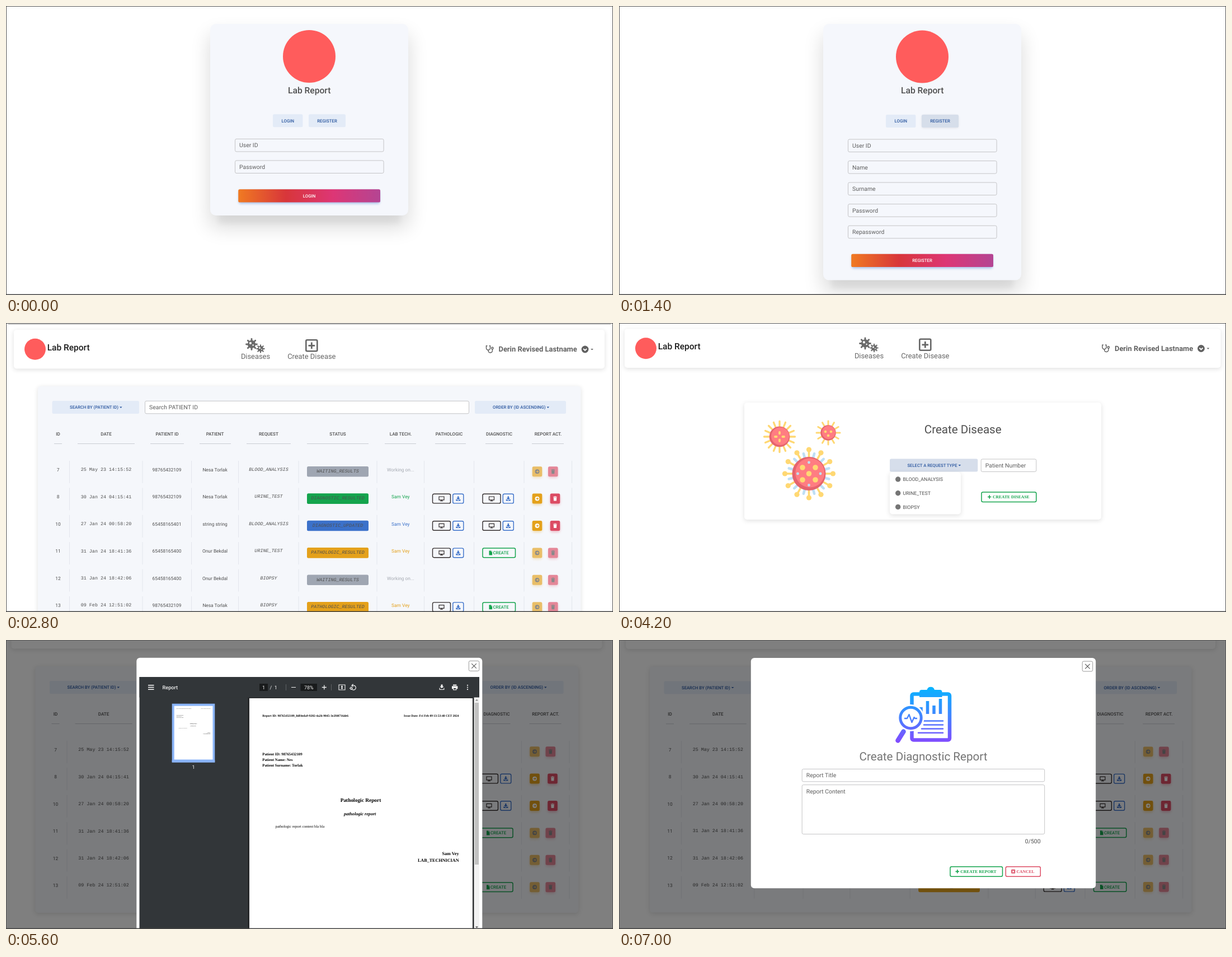
Write an HTML page that moves like this. It is 1085 px wide and 516 px high and loops after 8 s.

```html
<!DOCTYPE html>
<html lang="en">
<head>
<meta charset="utf-8">
<title>Lab report walkthrough</title>
<style>
html, body { margin: 0; width: 100%; height: 100%; overflow: hidden; background: #fff; }
svg { display: block; width: 1085px; height: 516px; font-family: Roboto, sans-serif; }
text { white-space: pre; text-rendering: geometricPrecision; }
.m { text-anchor: middle; }
.e { text-anchor: end; }
.w { font-weight: 500; }
.b { font-weight: 700; }
.i { font-style: italic; }
.mono { font-family: "Liberation Mono", monospace; }
.serif { font-family: "Liberation Serif", serif; }
</style>
</head>
<body>
<svg id="stage" viewBox="0 0 1085 516"></svg>
<script>
const INK = '#4f4f4f', BLUE = '#3b71ca', GREEN = '#14a44d', AMBER = '#e4a11b', RED = '#dc4c64', GREY = '#9fa6b2';
const NAVY = '#2c58a0', PALE = '#e3ebf7', PANEL = '#f5f7fb', LINE = '#c4c4c6';

// Basic shapes
const text = (x, y, s, size, fill = INK, cls = '') =>
  `<text x="${x}" y="${y}" font-size="${size}" fill="${fill}" class="${cls}">${s}</text>`;
const rect = (x, y, w, h, r, fill, more = '') =>
  `<rect x="${x}" y="${y}" width="${w}" height="${h}" rx="${r}" fill="${fill}" ${more}/>`;
const frame = (x, y, w, h, color, width = 1.3, fill = 'none') =>
  rect(x, y, w, h, 2.5, fill, `stroke="${color}" stroke-width="${width}"`);
const dot = (x, y, r, fill, more = '') => `<circle cx="${x}" cy="${y}" r="${r}" fill="${fill}" ${more}/>`;
const stroke = (d, color, width = 1, more = '') =>
  `<path d="${d}" fill="none" stroke="${color}" stroke-width="${width}" ${more}/>`;
const shape = (d, fill) => `<path d="${d}" fill="${fill}"/>`;
const at = (x, y, s, scale = 1) => `<g transform="translate(${x} ${y}) scale(${scale})">${s}</g>`;
const shadow = (x, y, w, h, dy, blur, alpha, color = '#000') =>
  rect(x, y + dy, w, h, 4, color, `opacity="${alpha}" style="filter:blur(${blur}px)"`);
const card = (x, y, w, h, fill = '#fff') => shadow(x, y, w, h, 2, 4, .12) + rect(x, y, w, h, 5, fill);
const rays = (n, r1, r2, width, color, ball = 0, turn = 0) => {
  let d = '', balls = '';
  for (let k = 0; k < n; k++) {
    const a = (k / n) * 2 * Math.PI + turn, c = Math.cos(a), s = Math.sin(a);
    d += `M${c * r1} ${s * r1}L${c * r2} ${s * r2}`;
    if (ball) balls += dot(c * r2, s * r2, ball, color);
  }
  return stroke(d, color, width, 'stroke-linecap="round"') + balls;
};

// Form parts
const caret = (x, y, color) => shape(`M${x} ${y}h4.6l-2.3 2.4z`, color);
const input = (x, y, w, h, label, fill = 'none') =>
  frame(x, y, w, h, LINE, 1, fill) + text(x + 7.6, y + 15, label, 10.4, '#5e5e5e');
const button = (x, y, w, label, fill = PALE) =>
  rect(x, y, w, 23, 2.5, fill) + text(x + w / 2, y + 14.2, label, 7.8, NAVY, 'm w');
const dropdown = (x, y, w, label, end, fill) =>
  rect(x, y, w, 23, 2.5, fill) + text(end, y + 14.2, label, 7.7, NAVY, 'e w') + caret(end + 2, y + 10.5, NAVY);
const closeBox = (x, y) => frame(x, y, 18.5, 18, '#999', 1) +
  stroke(`M${x + 5} ${y + 4.8}l8.5 8.5m0 -8.5l-8.5 8.5`, '#555', 1.1);
const plus = (x, y, r, color, width) => stroke(`M${x - r} ${y}h${2 * r}M${x} ${y - r}v${2 * r}`, color, width);
const outlined = (x, y, w, label, color, tx) =>
  frame(x, y, w, 17.5, color, 1.5) + text(tx, y + 11.3, label, 7.6, color, 'serif b');

// Small icons, centred on 0,0
const monitor = stroke('M-4.5 -3.6h9v5.8h-9zM-2.4 4h4.8M0 2v2', '#332d2d', 1.2);
const download = shape('M-1.2 -4h2.4v3h2.2l-3.4 3.2l-3.4 -3.2h2.2zM-4 1.4h1.6l2.4 2l2.4 -2h1.6v2.6h-8z', BLUE);
const file = shape('M-2.8 -4h3.4v2.2h2.2v5.8h-5.6zM1.2 -4l1.6 1.6h-1.6z', GREEN);
const trash = c => shape('M-3.2 -3.6h2l.5 -.7h1.4l.5 .7h2v1.1h-6.4zM-2.8 -2h5.6l-.4 6h-4.8z', c);
const arrow = (c, bg) => dot(0, 0, 3.9, c) + stroke('M-2.2 0h4M0 -1.9l1.9 1.9l-1.9 1.9', bg, 1.1);
const germ = (r, n) => rays(n, 0, r * .9, r * .28, '#6b6b6b') + dot(0, 0, r * .68, '#6b6b6b') +
  dot(-r * .2, -r * .2, r * .2, '#fff') + dot(r * .25, r * .15, r * .12, '#fff');
const stethoscope = stroke('M-3.5 -6h-2v4a3.5 3.5 0 0 0 7 0v-4h-2M-2 1.5v1a3.7 3.7 0 0 0 7.4 0v-3', '#616161', 1.5) +
  dot(5.4, -1.8, 1.7, '#fff', 'stroke="#616161" stroke-width="1.4"');

function sign(dy, height, fields, action, registering) {
  const bottom = 32 + height, by = bottom - 46.7;
  return shadow(365, 32, 354, height, 20, 18, .15) + shadow(379, 46, 326, height - 14, 15, 4, .03) +
    rect(365, 32, 354, height, 10, '#f5f7fc') +
    at(0, dy,
      dot(542, 90, 47, '#ff5c5c') +
      text(542.2, 155.7, 'Lab Report', 15.6, INK, 'm w') +
      button(477, 193.3, 53.5, 'LOGIN') +
      (registering ? shadow(541, 193, 66, 23, 1.5, 2, .08) : '') +
      button(541, 193.3, 66, 'REGISTER', registering ? '#d6deea' : PALE) +
      fields.map((f, k) => input(409.5, 237.4 + 38.55 * k, 265.6, 22.6, f)).join('')) +
    shadow(416, by, 252, 23.3, 2.5, 2, .4, BLUE) +
    rect(415.2, by, 253.8, 23.3, 2.6, 'url(#warm)') +
    text(542, by + 14.3, action, 7.8, '#fff', 'm w');
}

function header(x, right, y, nav) {
  return card(x, y, right - x, 69.5) +
    dot(x + 38, y + 34.7, 19, '#ff5c5c') +
    text(x + 59.7, y + 36.5, 'Lab Report', 15.5, '#1c1c1c', 'w') +
    at(nav - 7, y + 26, germ(10.5, 8)) + at(nav + 9, y + 34, germ(7.5, 8)) +
    text(nav, y + 52, 'Diseases', 12.9, '#666', 'm') +
    rect(nav + 90.3, y + 18.3, 20, 20, 2, 'none', 'stroke="#666" stroke-width="2.6"') +
    plus(nav + 100.3, y + 28.3, 5.8, '#666', 2.8) +
    text(nav + 100.3, y + 52, 'Create Disease', 12.9, '#666', 'm') +
    at(right - 206, y + 34.8, stethoscope) +
    text(right - 189.5, y + 39, 'Derin Revised Lastname', 12.9, '#616161', 'b') +
    dot(right - 35, y + 35, 6.4, '#616161') +
    stroke(`M${right - 38} ${y + 34}l3 3l3 -3`, '#fff', 1.8) +
    caret(right - 24.8, y + 34, '#616161');
}

// Column: title, centre, underline start and end, separator
const COLUMNS = [
  ['ID', 93, 86, 100, 113.5], ['DATE', 179, 128, 230, 244], ['PATIENT ID', 288, 258, 318, 331.5],
  ['PATIENT', 373.5, 346, 402, 415.5], ['REQUEST', 469.5, 430, 509, 523], ['STATUS', 593, 538, 648, 663],
  ['LAB TECH.', 705.5, 677, 733, 747.5], ['PATHOLOGIC', 792, 767, 822, 836.5],
  ['DIAGNOSTIC', 881.5, 857, 906, 926], ['REPORT ACT.', 969, 940, 997, 1011.5]];
const STATUS = {
  WAITING_RESULTS: GREY, DIAGNOSTIC_RESULTED: GREEN, DIAGNOSTIC_UPDATED: BLUE, PATHOLOGIC_RESULTED: AMBER };
const ROWS = [
  [7, '25 May 23 14:15:52', '98765432109', 'Nesa Torlak', 'BLOOD_ANALYSIS', 'WAITING_RESULTS'],
  [8, '30 Jan 24 04:15:41', '98765432109', 'Nesa Torlak', 'URINE_TEST', 'DIAGNOSTIC_RESULTED'],
  [10, '27 Jan 24 00:58:20', '65458165401', 'string string', 'BLOOD_ANALYSIS', 'DIAGNOSTIC_UPDATED'],
  [11, '31 Jan 24 18:41:36', '65458165400', 'Onur Bekdal', 'URINE_TEST', 'PATHOLOGIC_RESULTED'],
  [12, '31 Jan 24 18:42:06', '65458165400', 'Onur Bekdal', 'BIOPSY', 'WAITING_RESULTS'],
  [13, '09 Feb 24 12:51:02', '98765432109', 'Nesa Torlak', 'BIOPSY', 'PATHOLOGIC_RESULTED']];

const viewPair = (x, y) => frame(x, y - 8.3, 32, 16.6, '#332d2d', 1.4) + at(x + 16, y, monitor) +
  frame(x + 36.3, y - 8.3, 19, 16.6, BLUE, 1.4) + at(x + 45.8, y, download);
const action = (x, y, color, icon, off) => `<g opacity="${off ? .65 : 1}">` +
  shadow(x, y - 9, 17.6, 18, 2.5, 2, .35, color) + rect(x, y - 9, 17.6, 18, 2.5, color) + at(x + 8.8, y, icon) + '</g>';

function row([id, date, pid, name, request, status], k) {
  const y = 262 + 48.4 * k, mid = y + 3.2, color = STATUS[status];
  const waiting = color === GREY, done = status.startsWith('DIAG'), glyph = done ? '#fff' : INK;
  let s = COLUMNS.map(c => stroke(`M${c[4]} ${y - 16}v40`, '#e1e4ea', .9)).join('') +
    text(93, y + 3, id, 8.4, INK, 'm') + text(179, y + 2.3, date, 8.4, INK, 'm mono') +
    text(287.5, y + 3, pid, 8.4, INK, 'm') + text(373.5, y + 3, name, 8.4, INK, 'm') +
    text(469.5, y + 2, request, 8.4, INK, 'm mono i') +
    rect(538, mid - 9.3, 110, 18.6, 2.5, color) + text(593, y + 5, status, 8.4, INK, 'm mono i') +
    text(705.3, y + 3, waiting ? 'Working on...' : 'Sam Vey', 8.4, waiting ? '#a6aab2' : color, 'm');
  if (!waiting) s += viewPair(762.5, mid);
  if (done) s += viewPair(852, mid);
  else if (!waiting) s += frame(852, mid - 8.3, 58.5, 16.6, GREEN, 1.5) + at(866.3, mid, file) +
    text(870.5, mid + 2.7, 'CREATE', 7.8, GREEN, 'w');
  return s + action(940.7, mid, AMBER, arrow(glyph, AMBER), !done) +
    action(done ? 972.7 : 969, mid, RED, trash(glyph), !done);
}

const list = header(14, 1070, 12, 446) + card(57, 113, 970.5, 440, PANEL) +
  dropdown(82.5, 139, 155.5, 'SEARCH BY (PATIENT ID)', 201, PALE) +
  input(248.5, 139.3, 579, 22.5, 'Search PATIENT ID', '#fff') +
  dropdown(838, 139, 163, 'ORDER BY (ID ASCENDING)', 964.5, PALE) +
  COLUMNS.map(([s, x, a, b]) => text(x, 201, s, 8.1, INK, 'm w') + stroke(`M${a} 215.5H${b}`, '#c9ccd3', 1)).join('') +
  ROWS.map(row).join('');

// Creating a disease
const virus = (r, spikes) => spikes + dot(0, 0, r, '#e5646e') +
  dot(r * .06, -r * .05, r * .87, '#ff7d82');
const YELLOW = '#ffd873', SKY = '#bfdff5';
const dots = (points, r, color) => points.map(([x, y]) => dot(x, y, r, color)).join('');
const viruses =
  at(287, 203, virus(18.3, rays(16, 14, 27.5, 3.4, YELLOW)) +
    [0, 90, 180, 270].map(a => `<g transform="rotate(${a})">${rect(-1.9, -10, 3.8, 6.5, 1.9, YELLOW)}</g>`).join('')) +
  at(374, 196, virus(13.7, rays(12, 10, 21, 3, YELLOW)) + dots([[-5, -2], [5, -2], [0, 5]], 2.3, YELLOW)) +
  at(339.5, 269, virus(30, rays(12, 28, 37, 4.6, SKY, 0, Math.PI / 12) + rays(12, 25, 43, 3.6, YELLOW, 4.6)) +
    dots([[0, 0], [-11.5, -11], [11.5, -11], [-11.5, 11], [11.5, 11]], 4.8, YELLOW) +
    dots([[0, -20], [0, 20.5], [-20, 0], [20.5, 0]], 2.4, SKY));

const create = header(10, 1075.5, 10.5, 447) + card(224, 142, 638, 209) + viruses +
  text(614.7, 197, 'Create Disease', 20.6, INK, 'm') +
  dropdown(484, 242.5, 157.3, 'SELECT A REQUEST TYPE', 604.5, '#d6deeb') +
  input(647.2, 243, 98.6, 22.5, 'Patient Number') +
  card(484, 266, 127, 75.5) +
  ['BLOOD_ANALYSIS', 'URINE_TEST', 'BIOPSY'].map((s, k) =>
    dot(498.7, 279 + 24.7 * k, 4.7, '#757575') + text(507.5, 282.2 + 24.7 * k, s, 8.8)).join('') +
  outlined(648, 302, 97.8, 'CREATE DISEASE', GREEN, 668) + plus(662.2, 310.5, 3.2, GREEN, 1.6);

// Report viewer
const page = rect(435, 104, 399, 555, 0, '#fff') +
  text(458.3, 136.5, 'Report ID: 98765432109_8df4eda9-9202-4a26-9045-3e2f40716de6', 5.5, '#000', 'serif b') +
  text(809.5, 136.5, 'Issue Date: Fri Feb 09 13:53:48 CET 2024', 5.5, '#000', 'serif b e') +
  ['Patient ID: 98765432109', 'Patient Name: Nes', 'Patient Surname: Torlak'].map((s, k) =>
    text(458.3, 206.3 + 10 * k, s, 6.8, '#000', 'serif b')).join('') +
  text(634, 289, 'Pathologic Report', 9.4, '#000', 'serif b m') +
  text(632.7, 313.2, 'pathologic report', 8.1, '#000', 'serif b i m') +
  text(481.5, 335.3, 'pathologic report content bla bla', 6.75, '#000', 'serif') +
  text(809.5, 383.5, 'Sam Vey', 8.15, '#000', 'serif b e') +
  text(809.5, 395.5, 'LAB_TECHNICIAN', 8.15, '#000', 'serif b e');

const toolbar = rect(238.5, 66, 607.5, 36.5, 0, '#323639') +
  stroke('M254 80.8h10.5M254 84.5h10.5M254 88.2h10.5', '#fff', 1.4) +
  text(279.5, 87.5, 'Report', 9.2, '#f1f1f1', 'w') +
  rect(453, 78, 15, 13, 0, '#191b1c') + text(460.5, 87.6, '1', 9, '#f1f1f1', 'm') + text(471.5, 87.6, '/  1', 9, '#f1f1f1') +
  stroke('M500.5 79v11M581.5 79v11', '#6b6e70', .8) +
  stroke('M510 84.5h8M595 80h11v9h-11zM600.5 82v5M599 83.5l1.5 -1.5l1.5 1.5M599 85.5l1.5 1.5l1.5 -1.5', '#f1f1f1', 1.1) +
  rect(526.5, 78, 29.5, 13, 0, '#191b1c') + text(541.3, 87.6, '78%', 9, '#f1f1f1', 'm') +
  plus(568.8, 84.5, 4, '#f1f1f1', 1.3) +
  stroke('M618 81.2h3.5a4 4 0 1 1 -3 6.8M620.5 78.8l-2.5 2.4l2.5 2.4M617 84l2.2 2.2l-2.2 2.2l-2.2 -2.2z', '#f1f1f1', 1.2) +
  shape('M777.5 79.5h3v3.2h2l-3.5 3.5l-3.5 -3.5h2z', '#f1f1f1') + stroke('M775.2 85.5v3h7.6v-3', '#f1f1f1', 1.2) +
  shape('M799 79.5h6.4v2h-6.4zM797 82.3h10.4v5h-2v2.2h-6.4v-2.2h-2z', '#f1f1f1') + rect(800.2, 86, 4, 2.3, 0, '#323639') +
  dots([[825, 80.8], [825, 84.5], [825, 88.2]], 1.1, '#f1f1f1');

const shade = rect(0, 0, 1085, 516, 0, '#000', 'opacity=".5"');
const scrolled = (x, y, scale = 1) => rect(0, 0, 1085, 516, 0, '#fff') + at(x, y, list, scale) + shade;

const viewer = scrolled(-4.5, -66) + rect(233.3, 31.7, 618, 500, 6, '#fff') + closeBox(827.3, 37.3) +
  rect(238.5, 66, 607.5, 450, 0, '#323639') + rect(432, 102, 404, 414, 0, '#27292b') + page + toolbar +
  rect(296.7, 113.7, 76.6, 104.8, 0, '#8ab4f8') + at(300.7 - 435 * .1725, 117.7 - 104 * .1725, page, .1725) +
  rect(296.7, 214.5, 76.6, 4, 0, '#8ab4f8') + text(335, 230, '1', 9, '#f1f1f1', 'm') +
  rect(836.5, 102.5, 9.5, 414, 0, '#f1f1f1') + rect(837.8, 112, 7.2, 289, 0, '#c1c1c1') +
  shape('M839 108.5h5l-2.5 -2.8z', '#888') + shape('M839 511.5h5l-2.5 2.8z', '#505050');

// Creating a report
const clipboard = rect(523.5, 96.5, 67.5, 82, 3, '#fff', 'stroke="url(#cool)" stroke-width="6.5"') +
  shape('M537 102v-9a4 4 0 0 1 4 -4h9.5a7 7 0 0 1 13.5 0h9.5a4 4 0 0 1 4 4v9z', 'url(#cool)') +
  stroke('M540 120v12M551.5 109v23M563 117v15M574.5 105v27', 'url(#cool)', 5.5) +
  stroke('M545 144.5h34M545 151.5h34M541 158.5h38M535 165.7h44', 'url(#cool)', 2.6, 'stroke-linecap="round"') +
  dot(521.5, 139, 24, '#fff') + stroke('M512 159l-13 21', '#fff', 13) +
  dot(521.5, 139, 18.7, '#fff', 'stroke="url(#cool)" stroke-width="5"') +
  stroke('M510 140h5l3.5 -7l5 14l4 -9l1.5 2h4', 'url(#cool)', 2.3, 'stroke-linejoin="round"') +
  stroke('M508.5 163.5l-10 16', 'url(#cool)', 8.5, 'stroke-linecap="round"');

const report = scrolled(-1.8, -65.3, .998) + rect(235.8, 32, 616.4, 411.3, 6, '#fff') + closeBox(828.2, 38) + clipboard +
  text(544, 215, 'Create Diagnostic Report', 20.6, '#757575', 'm') +
  input(327.2, 230.4, 433.5, 22.4, 'Report Title') + input(327.2, 258.6, 433.5, 88, 'Report Content') +
  text(753.5, 363, '0/500', 10.4, INK, 'e') +
  outlined(592, 404.7, 93.5, 'CREATE REPORT', GREEN, 610.3) + plus(604.8, 413.3, 3.3, GREEN, 1.7) +
  outlined(691.3, 404.7, 62, 'CANCEL', RED, 710.5) +
  rect(701.2, 409.8, 7, 7, 1, RED) + stroke('M703 411.6l3.4 3.4m0 -3.4l-3.4 3.4', '#fff', 1.1);

const scenes = [
  sign(0, 342, ['User ID', 'Password'], 'LOGIN'),
  sign(.6, 457.5, ['User ID', 'Name', 'Surname', 'Password', 'Repassword'], 'REGISTER', true),
  list + stroke('M4 2.2H1081', '#999', 1), create, viewer, report];

const gradient = (id, attrs, colors) => `<linearGradient id="${id}" ${attrs}>` +
  colors.map((c, k) => `<stop offset="${k / (colors.length - 1)}" stop-color="${c}"/>`).join('') + '</linearGradient>';

const stage = document.getElementById('stage');
stage.innerHTML = '<defs>' +
  gradient('warm', '', ['#f07a22', '#d8363a', '#dd3675', '#b44593']) +
  gradient('cool', 'gradientUnits="userSpaceOnUse" x1="0" x2="0" y1="84" y2="185"', ['#06b4ff', '#4186ff', '#8448ff']) +
  '</defs>' + scenes.map(s => `<g class="scene">${s}</g>`).join('') +
  rect(.5, .5, 1084, 515, 0, 'none', 'stroke="#555"') + rect(0, 514.5, 1085, 1.5, 0, '#444');
const groups = stage.querySelectorAll('.scene');

function tick() {
  const now = Math.min(5, Math.floor(performance.now() % 8000 / 1400));
  groups.forEach((g, k) => g.style.display = k === now ? '' : 'none');
  requestAnimationFrame(tick);
}
tick();
</script>
</body>
</html>
```
